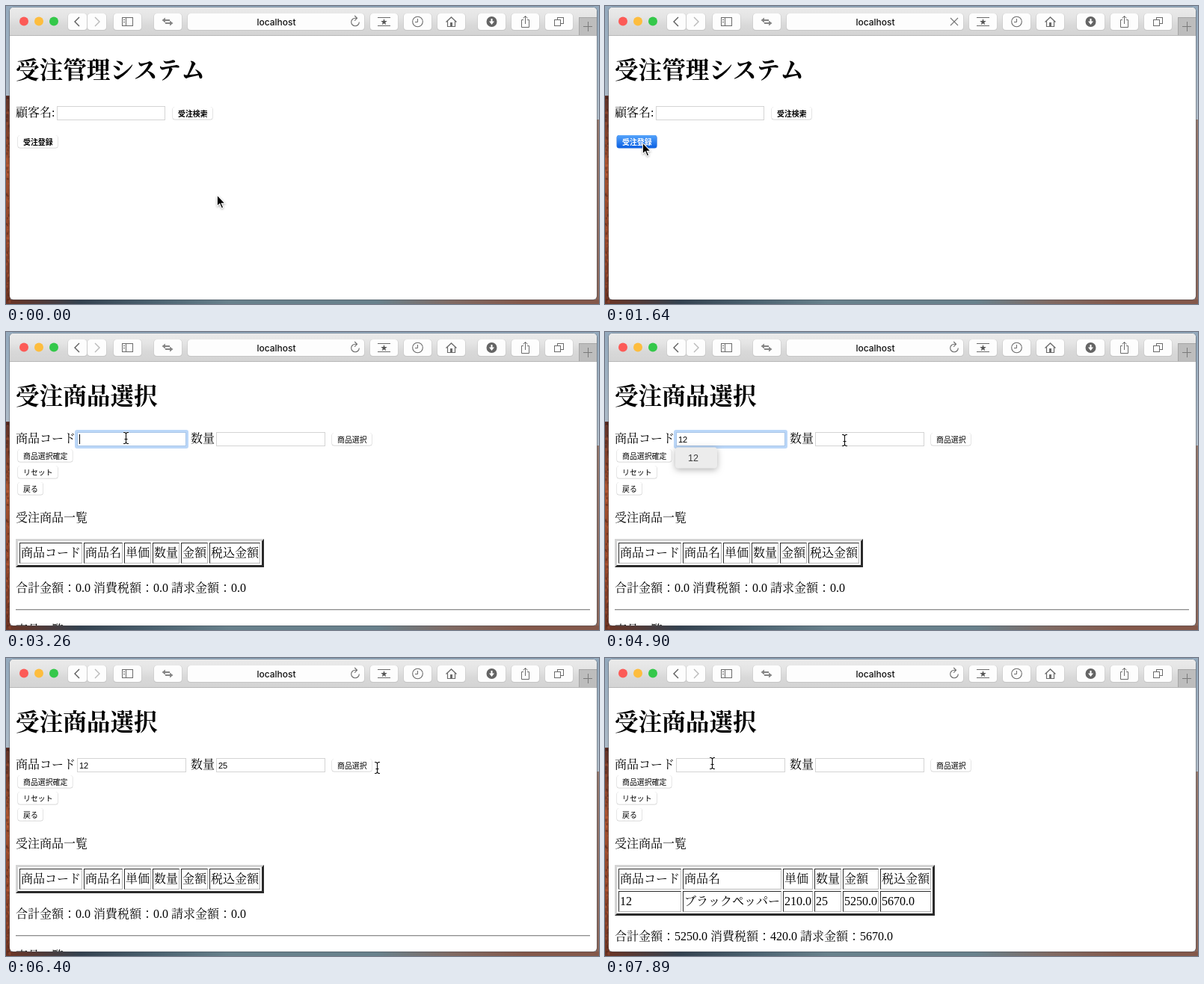
Animation, 793 px wide and 399 px high, one loop 8 s. Source, as an HTML page with a canvas:

```html
<!DOCTYPE html>
<html lang="ja">
<head>
<meta charset="utf-8">
<title>受注管理システム</title>
<style>
html, body { margin: 0; width: 100%; height: 100%; overflow: hidden; }
canvas { display: block; width: 793px; height: 399px; }
</style>
</head>
<body>
<canvas id="stage" width="793" height="399"></canvas>
<script>
const W = 793, H = 399, LOOP = 8000;
const TICK = 148.6, FIRST_TICK = 584; // the screen refreshes once per tick
const ctx = document.getElementById('stage').getContext('2d');
const SERIF = '"Liberation Serif", "Noto Serif CJK JP", "Noto Sans CJK JP", serif';
const BODY = '500 16px ' + SERIF;
const SANS = '"Noto Sans CJK JP", "Noto Sans CJK", sans-serif';
const LATIN = '"Liberation Sans", sans-serif';
const GRAY = '#6b6b6b';

// Story in ticks
const PRESS_NEW = 8, FORM_SHOWN = 9, FOCUS_CODE = 19, TYPE_CODE = 23, HINT_CODE = 27, FOCUS_COUNT = 32,
  TYPE_COUNT = 36, HINT_COUNT = 38, BLUR = 40, ON_BUTTON = 42, PRESS_ADD = 43, ROW_SHOWN = 45;

const START = { x: 282, y: 253 };
const MOVES = [
  { from: -1, to: 6, x: 50, y: 183 },
  { from: FORM_SHOWN, to: 12, x: 187, y: 138 },
  { from: 12, to: 14, x: 160, y: 142 },
  { from: 26, to: 30, x: 320, y: 145 },
  { from: HINT_COUNT, to: BLUR, x: 496, y: 147 },
  { from: 41, to: ON_BUTTON, x: 472, y: 146 },
  { from: ROW_SHOWN, to: 50, x: 143, y: 141 }
];

const within = (n, a, b) => n >= a && n < b;

function pointerAt(n) {
  let { x, y } = START;
  for (const m of MOVES) {
    const k = Math.min(1, Math.max(0, (n - m.from) / (m.to - m.from)));
    if (n === 0) break;
    x += (m.x - x) * k;
    y += (m.y - y) * k;
  }
  return [Math.round(x), Math.round(y)];
}

function rect(x, y, w, h, fill) {
  ctx.fillStyle = fill;
  ctx.fillRect(x, y, w, h);
}

function roundBox(x, y, w, h, r, fill) {
  ctx.fillStyle = fill;
  ctx.beginPath();
  ctx.roundRect(x, y, w, h, r);
  ctx.fill();
}

function disc(x, y, r, fill) {
  ctx.fillStyle = fill;
  ctx.beginPath();
  ctx.arc(x, y, r, 0, 7);
  ctx.fill();
}

function ring(x, y, r, end = 7) {
  ctx.strokeStyle = GRAY;
  ctx.lineWidth = 1.1;
  ctx.beginPath();
  ctx.arc(x, y, r, 0, end);
  ctx.stroke();
}

function box(x, y, w, h, color = GRAY) {
  ctx.strokeStyle = color;
  ctx.lineWidth = 1;
  ctx.strokeRect(x + 0.5, y + 0.5, w - 1, h - 1);
}

function trace(pts) {
  ctx.beginPath();
  for (let i = 0; i < pts.length; i += 2) ctx.lineTo(pts[i], pts[i + 1]);
}

function line(pts, color = GRAY, width = 1) {
  trace(pts);
  ctx.strokeStyle = color;
  ctx.lineWidth = width;
  ctx.stroke();
}

function poly(pts, fill) {
  trace(pts);
  ctx.fillStyle = fill;
  ctx.fill();
}

// Arrow head with its tip at x, y, pointing along dx, dy
const head = (x, y, dx, dy, d, w = d) =>
  [x - dx * d - dy * w, y - dy * d - dx * w, x, y, x - dx * d + dy * w, y - dy * d + dx * w];

function text(s, x, y, font = BODY, color = '#000', align = 'left') {
  ctx.font = font;
  ctx.fillStyle = color;
  ctx.textAlign = align;
  ctx.fillText(s, x, y);
}

function gradient(x0, y0, x1, y1, ...colors) {
  const g = ctx.createLinearGradient(x0, y0, x1, y1);
  colors.forEach((c, i) => g.addColorStop(i / (colors.length - 1), c));
  return g;
}

const vertical = (y0, y1, ...colors) => gradient(0, y0, 0, y1, ...colors);

function wallpaper() {
  let seed = 7;
  const rnd = () => (seed = seed * 16807 % 2147483647) / 2147483647;
  rect(0, 0, W, H, vertical(0, 160, '#93a9bd', '#b3bfca'));
  rect(0, 120, 6, H, vertical(120, H, '#5c3128', '#a2512f', '#90452a', '#6d3423'));
  rect(789, 152, 4, H, vertical(152, H, '#93776c', '#8a6558'));
  rect(0, 393, W, 6, gradient(0, 0, W, 0,
    '#6d3423', '#33414f', '#4b6270', '#68818c', '#68818c', '#68818c', '#806a63', '#84584a', '#84584a'));
  for (let i = 0; i < 130; i++) {
    const tone = rnd() < 0.5 ? 'rgba(50,18,12,.3)' : 'rgba(215,110,65,.25)';
    rect(rnd() * 5, 121 + rnd() * 275, 2, 2 + rnd() * 2, tone);
  }
}

function toolButton(x, w = 37) {
  roundBox(x - 0.5, 10, w + 1, 23, 4, '#c6c6c6');
  roundBox(x, 10, w, 22, 4, '#fdfdfd');
}

function star(x, y, r) {
  const pts = [];
  for (let i = 0; i < 10; i++) {
    const a = i * Math.PI / 5 - Math.PI / 2, d = i % 2 ? r * 0.4 : r;
    pts.push(x + d * Math.cos(a), y + d * Math.sin(a));
  }
  poly(pts, '#555');
}

function swapIcon(x, y) {
  for (const d of [-1, 1]) {
    const cy = y + d * 2;
    poly(head(x + d * 7.5, cy, d, 0, 4.5, 3.5), '#858585');
    rect(x + Math.min(d * 3.5, -d * 3), cy - 1, 6.5, 2, '#858585');
  }
}

function houseIcon(x) {
  line(head(x, 15, 0, -1, 6.5, 7), GRAY, 1.3);
  line([x - 5, 20, x - 5, 27.5, x + 5, 27.5, x + 5, 20], GRAY, 1.2);
  rect(x - 1.5, 22, 3, 6, GRAY);
}

function shareIcon(x) {
  line([x - 2.5, 18.5, x - 5, 18.5, x - 5, 28.5, x + 5, 28.5, x + 5, 18.5, x + 2.5, 18.5]);
  line([x, 24, x, 13.5]);
  line(head(x, 13.5, 0, -1, 3));
}

function toolIcons() {
  line(head(92, 21, -1, 0, 6), '#5c5c5c', 1.4);
  line(head(125, 21, 1, 0, 6), '#b9b9b9', 1.4);
  box(155, 15, 15, 12);
  rect(160, 15, 1, 12, GRAY);
  for (const y of [18, 21]) rect(157, y, 2, 1, GRAY);
  swapIcon(216, 21);
  for (const y of [15, 26]) rect(497, y, 17, 1, GRAY);
  star(505.5, 21.5, 4.5);
  ring(550.5, 21, 6.8);
  line([550.5, 17, 550.5, 21.5, 547, 21.5]);
  houseIcon(595.5);
  disc(649.5, 21, 7, '#646464');
  rect(648.5, 17, 2, 4, '#fff');
  poly(head(649.5, 25, 0, 1, 4.5, 3.5), '#fff');
  shareIcon(694.5);
  box(737, 15, 9, 9);
  rect(733, 18, 9, 9, '#fdfdfd');
  box(733, 18, 9, 9);
}

// Load bar: grows while the page arrives, then fades
function loadBar(age) {
  if (!within(age, 0, 5)) return;
  ctx.globalAlpha = age < 3 ? 1 : 0.6 - age * 0.1;
  rect(243, 30, 236 * Math.min(1, 0.14 + age * 0.43), 2, '#4285f4');
  ctx.globalAlpha = 1;
}

function addressBar(n) {
  toolButton(243, 236);
  text('localhost', 361.5, 26, '500 12px Inter, sans-serif', '#111', 'center');
  if (within(n, PRESS_NEW, FORM_SHOWN + 1) || within(n, PRESS_ADD + 1, ROW_SHOWN + 1)) {
    for (const d of [-5, 5]) line([467 - d, 16, 467 + d, 26], '#777', 1.1);
  } else {
    ring(467, 21.5, 5.3, 5.1);
    line(head(469.5, 16.3, 1, 0, 3.3), GRAY, 1.1);
  }
  loadBar(n - (n < ROW_SHOWN ? FORM_SHOWN : ROW_SHOWN));
}

function browser(n) {
  roundBox(4, 1.5, 787, 392.5, 6, 'rgba(70,75,82,.45)');
  roundBox(5, 2, 785, 391, 5, '#fff');
  roundBox(5, 2, 785, 38, [5, 5, 0, 0], vertical(2, 39, '#eaeaea', '#e5e5e5', '#d8d8d8', '#d4d4d4'));
  rect(5, 39, 785, 1, '#b8b8b8');
  ['#fc5b57', '#fdbd3e', '#34c84a'].forEach((c, i) => disc(24 + 20 * i, 20.5, 6, c));
  for (const x of [83, 109]) toolButton(x, 25);
  for (const x of [144, 198]) toolButton(x);
  for (let i = 0; i < 3; i++) {
    toolButton(487 + 45 * i);
    toolButton(631 + 45 * i);
  }
  toolIcons();
  rect(766, 15, 24, 24, '#a6a6a6');
  rect(767, 16, 23, 23, '#bdbdbd');
  rect(772, 27, 12, 1, '#7a7a7a');
  rect(778, 21, 1, 13, '#7a7a7a');
  addressBar(n);
}

function button(label, x, y, { weight = 500, pressed = false } = {}) {
  const w = label.length * 9.9 + 13.5;
  roundBox(x + 0.5, y, w + 1, 17.5, 3.5, pressed ? '#2a6fd6' : '#cdcdcd');
  roundBox(x + 1, y, w, 16.7, 3, pressed ? vertical(y, y + 17, '#55a4fb', '#0a60e4') : '#fff');
  text(label, x + 8, y + 12.6, `${weight} 9.9px ${SANS}`, pressed ? '#fff' : '#000');
}

function input(x, w, { value = '', focus = false, caret = false } = {}) {
  if (focus) roundBox(x - 3, 131, w + 6, 25, 3, '#bbd7f8');
  rect(x, 134, w, 19, '#fff');
  box(x, 134, w, 19, focus ? '#a9c6e8' : '#d4d4d4');
  text(value, x + 3, 148, '11px ' + LATIN);
  if (caret) rect(x + 3 + Math.round(value.length * 6.1), 137, 1, 13, '#000');
}

function suggestion(x, value) {
  ctx.save();
  ctx.shadowColor = 'rgba(0,0,0,.3)';
  ctx.shadowBlur = 8;
  ctx.shadowOffsetY = 2;
  roundBox(x, 154.5, 56, 28, 4, '#ececec');
  ctx.restore();
  text(value, x + 17, 173, '12.5px ' + LATIN, '#3c3c3c');
}

function bevel(x, y, w, h, d, light, dark) {
  rect(x, y, w, h, light);
  poly([x + w, y, x + w, y + h, x, y + h, x + d, y + h - d, x + w - d, y + h - d, x + w - d, y + d], dark);
  rect(x + d, y + d, w - 2 * d, h - 2 * d, '#fff');
}

function table(rows) {
  const left = 13, top = 277, inset = 5;
  ctx.font = BODY;
  const cols = rows[0].map((_, c) =>
    Math.round(Math.max(...rows.map(r => ctx.measureText(r[c]).width))) + 4);
  const width = cols.reduce((sum, w) => sum + w + 2, 8);
  bevel(left, top, width, rows.length * 30 + 8, 3, '#d4d4d4', '#2b2b2b');
  rows.forEach((row, r) => {
    let x = left + inset;
    const y = top + inset + r * 30;
    row.forEach((s, c) => {
      bevel(x, y, cols[c], 28, 1, '#2b2b2b', '#b8b8b8');
      text(s, x + 2, y + 19);
      x += cols[c] + 2;
    });
  });
}

function heading(s) {
  text(s, 13, 97, 'bold 31.6px ' + SERIF);
}

function totals(sum, tax, bill, y) {
  text(`合計金額：${sum} 消費税額：${tax} 請求金額：${bill}`, 13, y);
}

function startPage(n) {
  heading('受注管理システム');
  text('顧客名:', 13, 148);
  input(68, 145);
  button('受注検索', 222, 135, { weight: 700 });
  button('受注登録', 15, 173, { weight: 700, pressed: n >= PRESS_NEW });
}

function orderPage(n) {
  const done = n >= ROW_SHOWN;
  const field = (value, focus, type, hint, blur) => ({
    value: done ? '' : value.slice(0, Math.max(0, n - type + 1)),
    focus: within(n, focus, blur),
    caret: within(n, focus, hint)
  });
  heading('受注商品選択');
  text('商品コード', 13, 148);
  text('数量', 247, 148);
  input(95, 146, field('12', FOCUS_CODE, TYPE_CODE, HINT_CODE, FOCUS_COUNT));
  input(281, 146, field('25', FOCUS_COUNT, TYPE_COUNT, HINT_COUNT, BLUR));
  button('商品選択', 435, 135, { pressed: within(n, PRESS_ADD, ROW_SHOWN) });
  ['商品選択確定', 'リセット', '戻る'].forEach((s, i) => button(s, 15, 157 + 22 * i));
  text('受注商品一覧', 13, 254);

  const rows = [['商品コード', '商品名', '単価', '数量', '金額', '税込金額']];
  if (done) {
    rows.push(['12', 'ブラックペッパー', '210.0', '25', '5250.0', '5670.0']);
    totals('5250.0', '420.0', '5670.0', 378);
  } else {
    totals('0.0', '0.0', '0.0', 348);
    rect(13, 371, 768, 1, '#8f8f8f');
    rect(13, 372, 768, 1, '#d8d8d8');
    text('商品一覧', 13, 404);
  }
  table(rows);
  if (within(n, HINT_CODE, FOCUS_COUNT)) suggestion(94, '12');
  if (within(n, HINT_COUNT, BLUR)) suggestion(280, '25');
}

function arrow() {
  const shape = [0.9, 1.5, 0.9, 13.8, 4, 11, 6.7, 17.2, 8, 16.6, 5.4, 10.7, 9.7, 10.7];
  ctx.shadowColor = 'rgba(0,0,0,.35)';
  ctx.shadowBlur = 3;
  ctx.shadowOffsetY = 1;
  line([...shape, shape[0], shape[1]], '#fff', 2);
  ctx.shadowColor = 'transparent';
  poly(shape, '#000');
}

function iBeam() {
  for (const [color, width] of [['rgba(255,255,255,.7)', 2.4], ['#111', 1.1]]) {
    line([0.5, -6, 0.5, 6], color, width);
    line([-1.5, 1.5, 2.5, 1.5], color, width);
    for (const d of [-1, 1]) line([-3, 7.5 * d, -1, 7.5 * d, 0.5, 6 * d, 2, 7.5 * d, 4, 7.5 * d], color, width);
  }
}

function pointer(n) {
  const isArrow = n < FORM_SHOWN + 2 || within(n, ON_BUTTON, ROW_SHOWN + 1);
  ctx.save();
  ctx.translate(...pointerAt(n));
  (isArrow ? arrow : iBeam)();
  ctx.restore();
}

function draw(n) {
  wallpaper();
  browser(n);
  ctx.save();
  ctx.beginPath();
  ctx.roundRect(5, 40, 785, 353, [0, 0, 5, 5]);
  ctx.clip();
  (n < FORM_SHOWN ? startPage : orderPage)(n);
  ctx.restore();
  pointer(n);
}

function frame(now) {
  const t = now % LOOP;
  draw(Math.max(0, Math.floor((t - FIRST_TICK) / TICK) + 1));
  requestAnimationFrame(frame);
}
requestAnimationFrame(frame);
</script>
</body>
</html>
```
